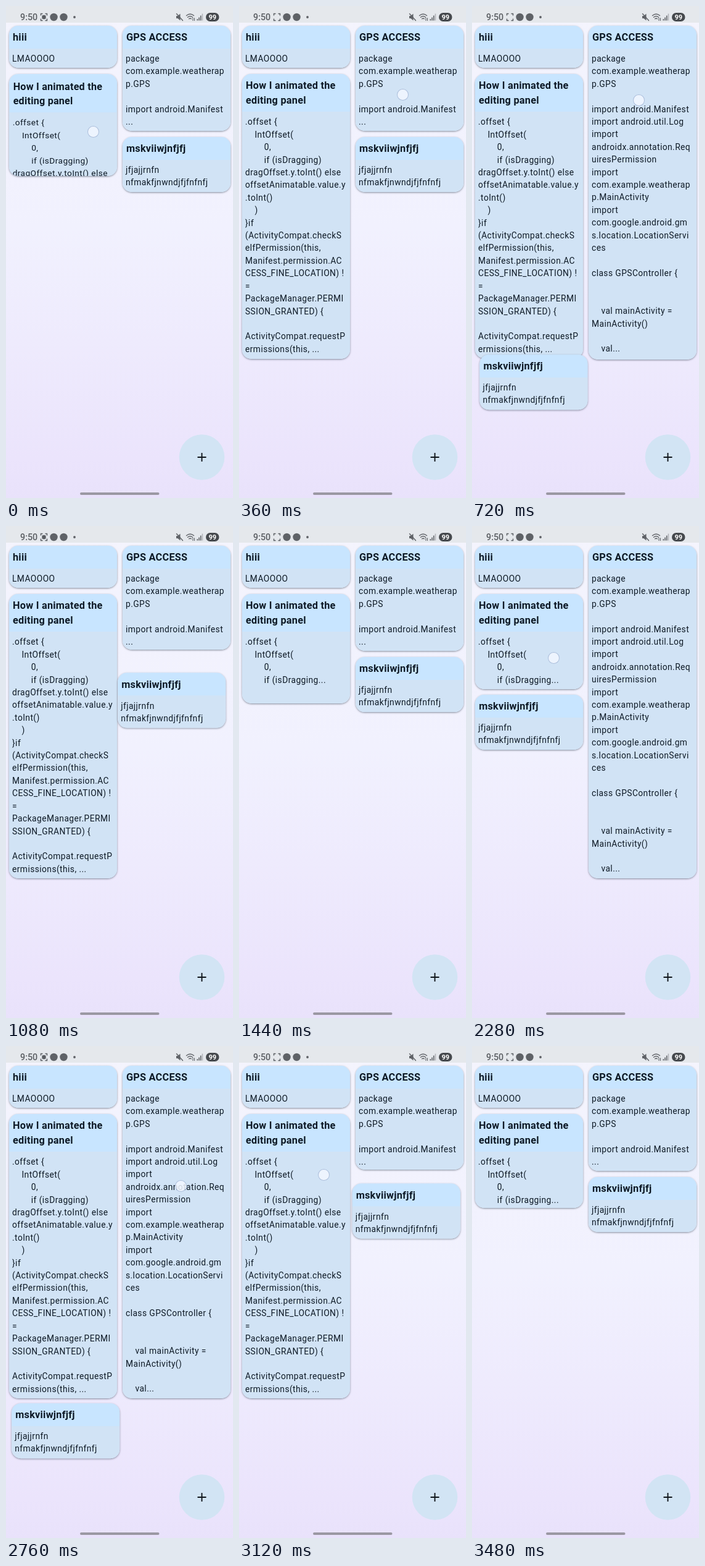
Animation, 368 px wide and 796 px high, one loop 3.6 s. Source, as an HTML page:

```html
<!DOCTYPE html>
<html lang="en">
<head>
<meta charset="utf-8">
<title>Notes grid</title>
<style>
html, body { margin: 0; width: 100%; height: 100%; overflow: hidden; }
body { font-family: Roboto, sans-serif; color: #0e1a26; }
#stage {
  position: relative; width: 368px; height: 796px; overflow: hidden;
  background: linear-gradient(#f4f4fd, #f1f1fe 45%, #ebe4fc 92%, #e9e2fb);
}
#stage > svg { position: absolute; left: 0; top: 0; }
.card {
  position: absolute; left: 0; top: 0; width: 175px; overflow: hidden;
  border-radius: 15px;
  background: linear-gradient(#c8e5ff 30px, #d1e3f5 30px);
  box-shadow: 0 1px 3px rgba(20, 35, 55, .5);
}
.head {
  padding: 6.6px 6px 6px; background: #c8e5ff;
  font-weight: 700; font-size: 16.3px; line-height: 24.4px; letter-spacing: .23px;
  white-space: pre;
}
.text {
  padding: 6px 5px 5px; background: #d1e3f5;
  font-size: 13.8px; line-height: 20.4px; letter-spacing: .43px;
  white-space: pre;
}
#dot {
  position: absolute; left: -9.5px; top: -9.5px; width: 17px; height: 17px;
  border-radius: 50%; border: 1px solid rgba(150, 172, 208, .75);
  background: rgba(243, 247, 255, .85);
}
</style>
</head>
<body>
<div id="stage">
  <svg width="368" height="796" viewBox="0 0 368 796">
    <rect width="368" height="27" fill="#e5e8ec"/>
    <text x="23" y="23" font-size="14.3" font-weight="500" fill="#595c61">9:50</text>
    <g fill="none" stroke="#5b5e63" stroke-width="1.4">
      <path d="M56.5 15.5v-3h3M63.500 12.500h3v3M66.500 20.500v3h-3M59.500 23.500h-3v-3"/>
      <g id="rec"><rect x="59" y="15.500" width="5" height="5" rx="1.500" fill="#5b5e63"/></g>
    </g>
    <g fill="#5f6267">
      <circle cx="77.500" cy="18" r="6.200"/>
      <circle cx="93.500" cy="18" r="6.200"/>
      <circle cx="111" cy="18" r="1.900"/>
      <path d="M276 16h2.500l4-3.500v11l-4-3.500h-2.500z"/>
      <path d="M309.500 23.500v-2.500h1.600v2.500zM312.200 23.500v-5h1.600v5zM314.900 23.500v-8h1.600v8z"/>
      <path d="M317.600 23.500v-11h1.600v11z" opacity=".4"/>
    </g>
    <g fill="none" stroke="#5f6267" stroke-width="1.400" stroke-linecap="round">
      <path d="M276.500 12.500l10 11M292.500 15.500q6-5 12 0M294.500 18.200q4-3.300 8 0M296.700 20.800q1.800-1.500 3.600 0"/>
      <path d="M303 19.500v4M305.500 19.500v4" stroke-width="1.100"/>
    </g>
    <rect x="324" y="11" width="21.500" height="14" rx="7" fill="#46494d"/>
    <text x="334.700" y="22" font-size="11" font-weight="700" text-anchor="middle" fill="#fff">99</text>
  </svg>
  <svg id="front" width="368" height="796" viewBox="0 0 368 796">
    <circle cx="317.500" cy="730" r="36.800" fill="#d2e4f4"/>
    <path d="M310.500 730h14M317.500 723v14" stroke="#10151b" stroke-width="1.900"/>
    <rect x="120" y="787" width="128.500" height="4" rx="2" fill="#9b98a3"/>
  </svg>
  <div id="dot"></div>
</div>
<script>
const LOOP = 3600, STEP = 120;
const LEFT = 5, RIGHT = 189;
const stage = document.getElementById('stage');
const front = document.getElementById('front');
const dot = document.getElementById('dot');
const rec = document.getElementById('rec');

const offsetCode = `.offset {
    IntOffset(
        0,
        if (isDragging`;
const gpsCode = `package
com.example.weatherap
p.GPS

import android.Manifest
`;

const notes = {
  hi: { x: LEFT, y: 32, title: 'hiii', short: 'LMAOOOO' },
  gps: {
    x: RIGHT, y: 32, lead: 0, title: 'GPS ACCESS',
    short: gpsCode + '...',
    long: gpsCode + `import android.util.Log
import
androidx.annotation.Req
uiresPermission
import
com.example.weatherap
p.MainActivity
import
com.google.android.gm
s.location.LocationServi
ces

class GPSController {


    val mainActivity =
MainActivity()

    val...`
  },
  how: {
    x: LEFT, y: 110, lead: 112, title: 'How I animated the\nediting panel',
    short: offsetCode + '...',
    long: offsetCode + `)
dragOffset.y.toInt() else
offsetAnimatable.value.y
.toInt()
    )
}if
(ActivityCompat.checkS
elfPermission(this,
Manifest.permission.AC
CESS_FINE_LOCATION) !
=
PackageManager.PERMI
SSION_GRANTED) {

ActivityCompat.requestP
ermissions(this, ...`
  },
  msk: { x: RIGHT, y: 212, title: 'mskviiwjnfjfj', short: 'jfjajjrnfn\nnfmakfjnwndjfjfnfnfj' }
};

// time, note, opens, finger x, finger y
const taps = [
  [430, 'gps', true, 265, 143],
  [770, 'gps', false, 270, 152],
  [1270, 'how', false, 136, 205],
  [1750, 'gps', true, 261, 161],
  [2330, 'how', true, 132, 213],
  [2830, 'gps', false, 283, 226],
  [3200, 'how', false, 137, 208],
  [3585, 'how', true, 141, 203]
];

// time, change of place for the last note
const span = RIGHT - LEFT;
const movesX = [[470, -span], [833, span], [1800, -span], [2460, span], [2510, -span], [2850, span]];
const movesY = [[470, 367], [863, -367], [1800, 61], [2350, 306], [2850, -367]];

// Underdamped spring for sizes, critically damped one for places
function bounce(ms) {
  if (ms <= 0) return 0;
  const t = ms / 1000, z = .85, w = 20, d = w * Math.sqrt(1 - z * z);
  return 1 - Math.exp(-z * w * t) * (Math.cos(d * t) + z * w / d * Math.sin(d * t));
}
function glide(ms) {
  if (ms <= 0) return 0;
  const a = ms / 50;
  return 1 - (1 + a) * Math.exp(-a);
}
// Changes of this loop plus the tails of the loop before
const total = (list, ease, t) =>
  list.reduce((sum, [at, by]) => sum + by * (ease(t - at) + ease(t + LOOP - at)), 0);

const lines = s => s.split('\n').length;
const heightOf = (n, text) => 12.6 + 24.4 * lines(n.title) + 11 + 20.4 * lines(text);

function add(parent, cls, text = '') {
  const el = document.createElement('div');
  el.className = cls;
  el.textContent = text;
  parent.append(el);
  return el;
}

for (const [key, n] of Object.entries(notes)) {
  n.card = add(stage, 'card');
  n.inner = add(n.card, 'inner');
  add(n.inner, 'head', n.title);
  n.text = add(n.inner, 'text', n.short);
  n.taps = taps.filter(tap => tap[1] === key);
  n.last = n.taps[n.taps.length - 1];
  const closed = heightOf(n, n.short);
  const grow = n.long ? heightOf(n, n.long) - closed : 0;
  // Each loop begins in the state left by the last tap
  n.base = n.last && n.last[2] ? closed + grow : closed;
  n.sizes = n.taps.map(([at, , open]) => [at, open ? grow : -grow]);
  place(n, n.x, n.y);
  n.card.style.height = n.base + 'px';
}
stage.append(front, dot);

function place(n, x, y) {
  n.card.style.transform = `translate(${x}px, ${y}px)`;
}

function drawNote(n, t) {
  const past = n.taps.filter(tap => tap[0] <= t);
  const [at, , open] = past.length ? past[past.length - 1] : n.last;
  const age = (t - at + LOOP) % LOOP;
  const text = open ? n.long : n.short;
  if (n.text.textContent !== text) n.text.textContent = text;
  n.card.style.height = n.base + total(n.sizes, bounce, t) + 'px';
  const zoom = 1 - .08 * Math.exp(-(age + n.lead) / 55);
  n.inner.style.transform = zoom > .999 ? 'none' : `scale(${zoom})`;
}

function draw(now) {
  const t = Math.floor(now % LOOP / STEP) * STEP;
  drawNote(notes.gps, t);
  drawNote(notes.how, t);
  place(notes.msk, RIGHT + total(movesX, glide, t), 212 + total(movesY, glide, t));

  const touch = taps.find(([at]) => (t - at + 90 + LOOP) % LOOP < 145);
  dot.style.display = touch ? 'block' : 'none';
  if (touch) dot.style.transform = `translate(${touch[3]}px, ${touch[4]}px)`;
  rec.style.display = (t + 110) % 900 < 450 ? 'inline' : 'none';
}

const start = performance.now();
function tick() {
  draw(performance.now() - start);
  requestAnimationFrame(tick);
}
tick();
</script>
</body>
</html>
```
